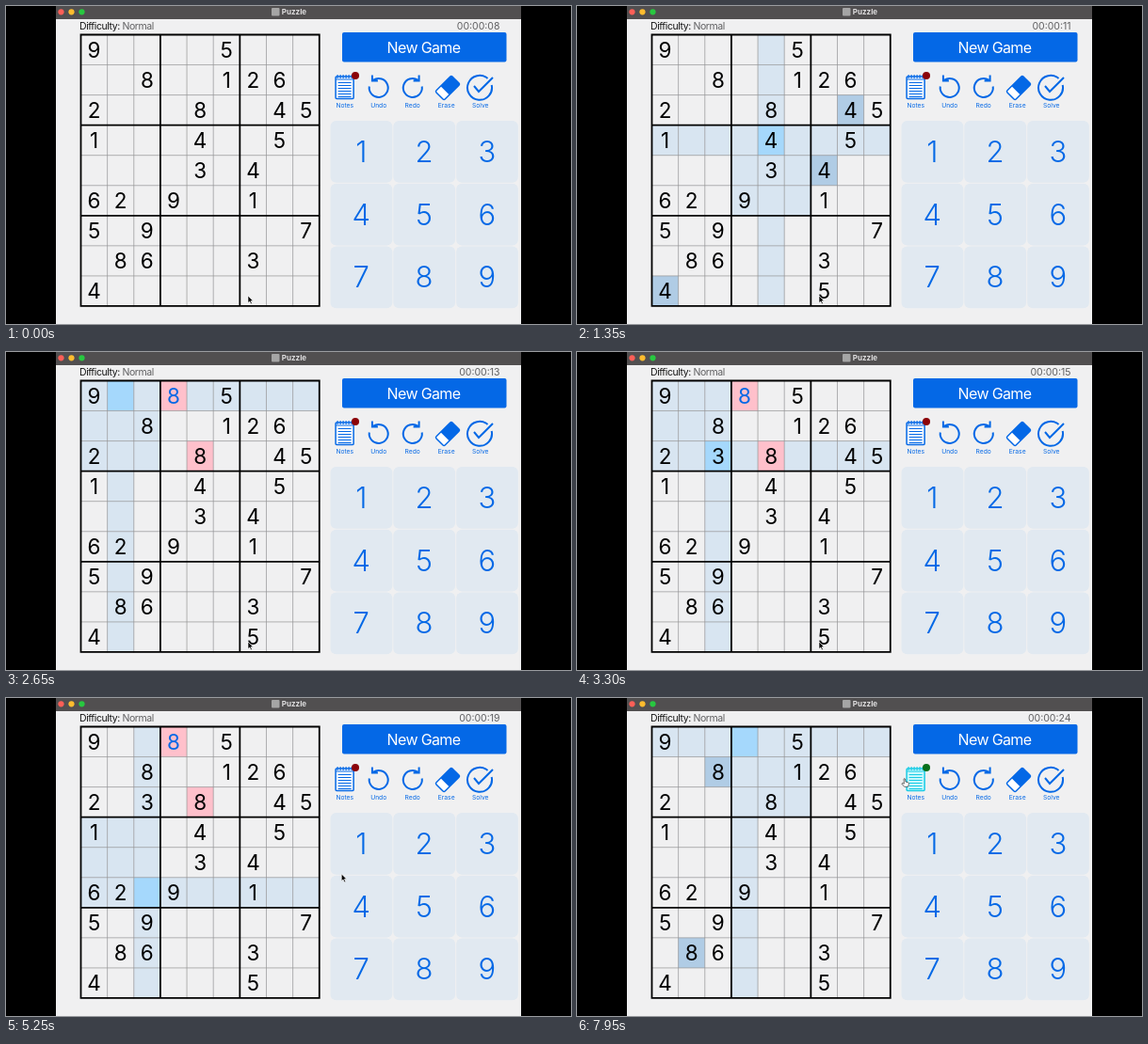
Animation of 600 by 338 pixels, one loop 8 s. Source, as an HTML page:

```html
<!DOCTYPE html>
<html lang="en">
<head>
<meta charset="utf-8">
<title>Number puzzle</title>
<style>
  html, body { margin: 0; width: 100%; height: 100%; overflow: hidden; background: #000; }
  svg { display: block; width: 600px; height: 338px; font-family: Inter, Roboto, sans-serif; }
  .mid { text-anchor: middle; }
  .tight { letter-spacing: -.04em; }
  .line { fill: none; stroke: #0468e6; stroke-width: 2; }
</style>
</head>
<body>
<svg id="stage" viewBox="0 0 600 338"></svg>
<script>
const LOOP = 8000, LEFT = 79.5, TOP = 30.5, CW = 28.14, CH = 32.05;
const BLUE = '#0468e6', PEER = '#d8e5f1', SELECTED = '#a5d8fc', MATCH = '#b0cce5', CONFLICT = '#ffc0cb';

const givens = ['9....5...', '..8..126.', '2...8..45', '1...4..5.', '....3.4..',
                '62.9..1..', '5.9.....7', '.86...3..', '4........'];

// Player entries: when typed and when removed
const entries = [
  { r: 8, c: 6, v: '5', from: 550, to: LOOP },
  { r: 0, c: 3, v: '8', from: 2200, to: 7400, wrong: true },
  { r: 2, c: 2, v: '3', from: 3300, to: 5600 }
];

// Selected cell: [time, row, column]
const selections = [
  [50, 8, 6], [650, 8, 5], [750, 8, 4], [850, 7, 4], [1000, 6, 4], [1100, 5, 4], [1200, 4, 4],
  [1300, 3, 4], [1400, 2, 4], [1500, 1, 4], [1600, 0, 4], [1850, 0, 3], [2500, 0, 2], [2600, 0, 1],
  [2900, 1, 1], [3000, 2, 1], [3150, 2, 2], [3400, 3, 2], [3500, 4, 2], [3600, 4, 1],
  [4300, 5, 1], [4450, 5, 2], [6750, 0, 3]
];

// Pointer tip: [time, x, y]
const pointerPath = [
  [0, 257, 308], [4700, 257, 308], [5000, 300, 330], [5450, 396, 86], [6350, 396, 86],
  [6550, 233, 143], [6700, 178, 46], [6800, 178, 46], [7150, 468, 86], [7400, 468, 86],
  [7800, 347, 86], [LOOP, 347, 86]
];

const stage = document.getElementById('stage');
const range = n => [...Array(n).keys()];
const rect = (x, y, w, h, fill, extra = '') =>
  `<rect x="${x}" y="${y}" width="${w}" height="${h}" fill="${fill}" ${extra}/>`;
const dot = (x, y, r, fill, extra = '') => `<circle cx="${x}" cy="${y}" r="${r}" fill="${fill}" ${extra}/>`;
const text = (x, y, size, fill, str, extra = 'class="mid"') =>
  `<text x="${x}" y="${y}" font-size="${size}" fill="${fill}" ${extra}>${str}</text>`;

function gridLines(major) {
  let d = '';
  for (let i = 0; i < 10; i++) {
    if ((i % 3 === 0) !== major) continue;
    d += `M${LEFT + i * CW} ${TOP}v${9 * CH}M${LEFT} ${TOP + i * CH}h${9 * CW}`;
  }
  return `<path d="${d}" fill="none" stroke="${major ? '#000' : '#929294'}"
    stroke-width="${major ? 1.8 : .7}" stroke-linecap="square"/>`;
}

function board() {
  const cells = range(81).map(i => {
    const x = LEFT + i % 9 * CW, y = TOP + Math.floor(i / 9) * CH;
    return rect(x, y, CW, CH, 'none', 'class="cell"') +
      text(x + CW / 2, y + CH / 2 + 8.4, 22.5, '#000', '', 'class="mid digit"');
  });
  return cells.join('') + gridLines(false) + gridLines(true);
}

function toolbar() {
  const turn = '<path class="line" d="M-5.5-8.4A10 10 0 1 1-9.9-1.5M-6.8-13.5V-7.6H-.8"/>';
  const at = (x, body) => `<g transform="translate(${x} 87)">${body}</g>`;
  const rings = range(6).map(i => `M${-7.5 + i * 3}-14v4`).join('');
  const rules = range(6).map(i => `M-7 ${-5.5 + i * 3}h14`).join('');
  return at(359.6, rect(-9.5, -12, 19, 23.5, '#fff', 'id="page" rx="1" stroke-width="1.5"') +
      `<path id="rules" fill="none" stroke-width="1.1" d="${rings}M-9-9h18${rules}"/>`) +
    dot(371, 74, 4, '', 'id="mode"') +
    at(395.7, turn) + at(431.8, `<g transform="scale(-1 1)">${turn}</g>`) +
    at(469, `<g transform="rotate(-45)">${rect(-12, -6.5, 24, 13, '#fff', `rx="1.5" stroke="${BLUE}" stroke-width="1.5"`)
      }${rect(-4, -6.5, 16, 13, BLUE, 'rx="1"')}</g>`) +
    at(503, '<path class="line" d="M8.5-10A13 13 0 1 0 12.7-3M-6-2l5 6L14-11"/>') +
    ['Notes', 'Undo', 'Redo', 'Erase', 'Solve'].map((s, i) => text(359.7 + i * 36, 108.2, 6.7, BLUE, s)).join('');
}

function keypad() {
  return range(9).map(i => {
    const x = 344.5 + i % 3 * 66.8, y = 122 + Math.floor(i / 3) * 66.7;
    return rect(x, y, 65.8, 65.8, '#e1e9f1', 'rx="6"') +
      text(x + 32.8, y + 44, 31, BLUE, i + 1, 'class="mid" font-weight="300"');
  }).join('');
}

stage.innerHTML =
  rect(53, 0, 494, 338, '#f0f0f1') + rect(53, 0, 494, 14, '#514f50') +
  ['#fe5f57', '#febc2e', '#28c840'].map((c, i) => dot(58.5 + i * 11, 6.3, 3.1, c)).join('') +
  rect(282, 2, 8.5, 8.5, '#a5a5a5', 'rx="1"') +
  text(306, 9.2, 8, '#e0dfe0', 'Puzzle', 'class="mid" font-weight="700"') +
  text(78, 24.7, 10.5, '#151515', 'Difficulty: <tspan fill="#606062">Normal</tspan>', 'class="tight"') +
  text(524.5, 24.7, 10.5, '#606062', '', 'id="clock" text-anchor="end"') +
  rect(357, 28, 174.5, 31.5, BLUE, 'rx="2"') +
  text(443.5, 50, 16, '#fff', 'New Game', 'class="mid tight"') +
  toolbar() + board() + keypad() +
  `<g id="pointer" stroke="#fff" stroke-width=".6" stroke-linejoin="round">
    <path id="arrow" d="M0 0V7.6L1.8 6 3 8.8 4.3 8.2 3.1 5.5H5.4Z"/>
    <path id="hand" fill="#fff" stroke="#111" d="M0 0q1-1 1.5 0l.4 3 2.8.8q1 .3.7 1.7l-.8 2.8H.6L-2.2 5q.2-1.2 2.6.1Z"/>
  </g>`;

const get = id => document.getElementById(id);
const cells = stage.querySelectorAll('.cell'), digits = stage.querySelectorAll('.digit');
const [page, rules, mode, clock, pointer, arrow, hand] =
  ['page', 'rules', 'mode', 'clock', 'pointer', 'arrow', 'hand'].map(get);

const entryAt = (r, c, t) => entries.find(e => e.r === r && e.c === c && t >= e.from && t < e.to);
const valueAt = (r, c, t) => givens[r][c] !== '.' ? givens[r][c] : entryAt(r, c, t)?.v ?? '';
const third = n => Math.floor(n / 3);

function cellColor(r, c, t, selection) {
  const clash = t >= 2200 && t < 7400 && (r === 0 && c === 3 || r === 2 && c === 4);
  if (!selection) return 'none';
  const [since, sr, sc] = selection;
  const undone = t >= 5600 && t < 6750 && r === 2 && c === 2;
  if (undone || r === sr && c === sc) return SELECTED;
  if (clash) return CONFLICT;
  if (r === sr || c === sc || third(r) === third(sr) && third(c) === third(sc)) return PEER;
  const value = valueAt(sr, sc, since);
  return value && valueAt(r, c, t) === value ? MATCH : 'none';
}

function pointerAt(t) {
  const i = pointerPath.findIndex(p => p[0] > t);
  const [t0, x0, y0] = pointerPath[i - 1], [t1, x1, y1] = pointerPath[i];
  const u = (t - t0) / (t1 - t0), k = u * u * (3 - 2 * u);
  return [x0 + (x1 - x0) * k, y0 + (y1 - y0) * k];
}

function draw(t) {
  const selection = selections.findLast(s => s[0] <= t);
  cells.forEach((cell, i) => {
    const r = Math.floor(i / 9), c = i % 9;
    cell.setAttribute('fill', cellColor(r, c, t, selection));
    digits[i].textContent = valueAt(r, c, t);
    digits[i].setAttribute('fill', entryAt(r, c, t)?.wrong ? BLUE : '#000');
  });

  // The recorded clock runs at double speed
  clock.textContent = '00:00:' + String(Math.floor(8.6 + t / 500)).padStart(2, '0');

  const notes = t >= 7850;
  page.setAttribute('stroke', notes ? '#19cbe5' : BLUE);
  page.setAttribute('fill', notes ? '#c8f8fc' : '#fff');
  rules.setAttribute('stroke', notes ? '#19cbe5' : BLUE);
  mode.setAttribute('fill', notes ? '#08701a' : '#8b0308');

  const [x, y] = pointerAt(t);
  const overTool = x > 346 && y < 100;
  pointer.setAttribute('transform', `translate(${x} ${y})`);
  arrow.style.display = overTool ? 'none' : '';
  hand.style.display = overTool ? '' : 'none';
}

const start = performance.now();
function tick() {
  draw((performance.now() - start) % LOOP);
  requestAnimationFrame(tick);
}
tick();
</script>
</body>
</html>
```
